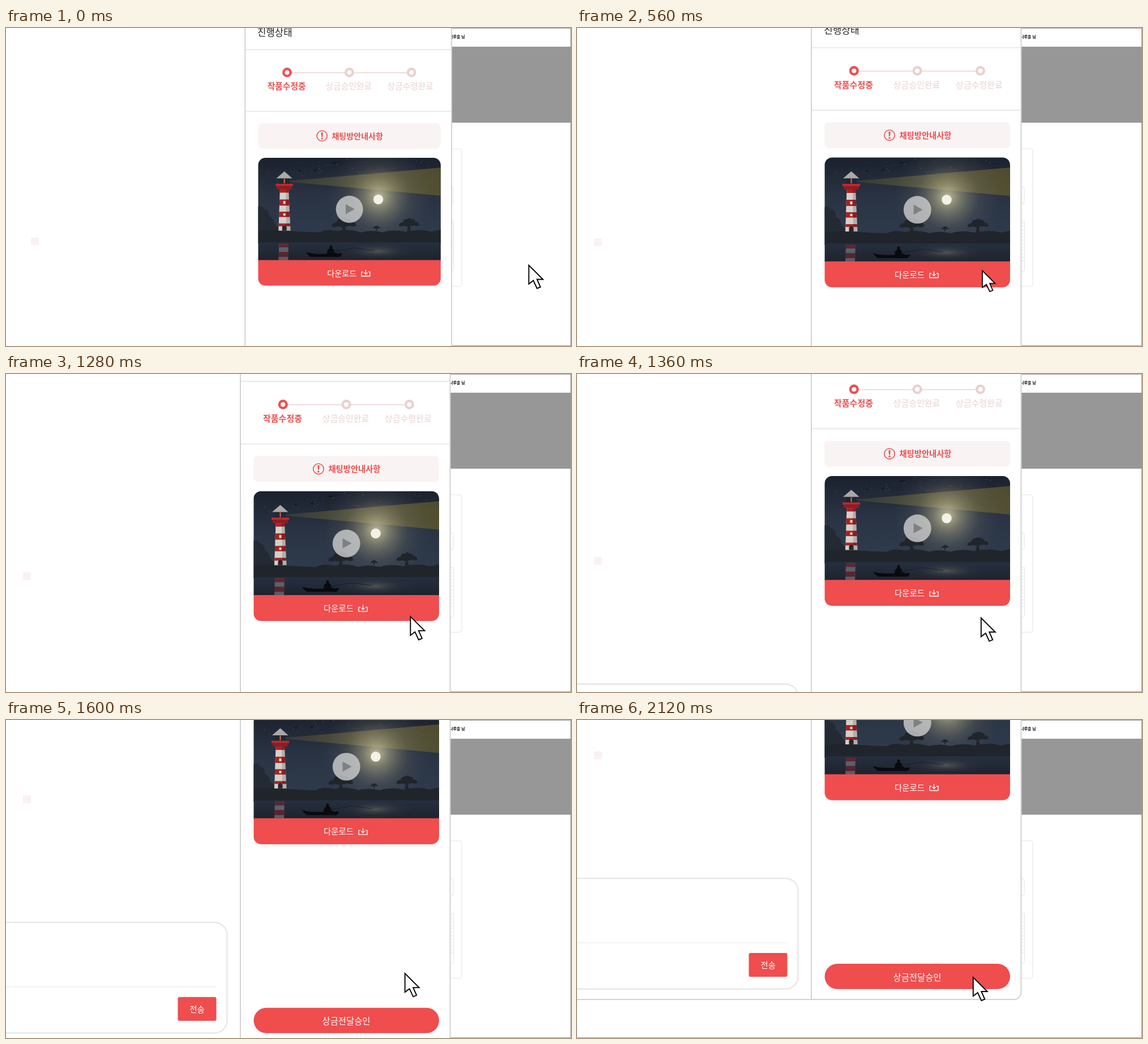
Write an HTML page that moves like this. It is 998x561 px and loops after 3.6 s.

```html
<!DOCTYPE html>
<html lang="ko">
<head>
<meta charset="utf-8">
<title>진행상태</title>
<style>
  html, body { margin: 0; width: 100%; height: 100%; overflow: hidden; background: #fff; }
  svg { display: block; width: 100vw; height: 100vh; }
  text { font-family: "Noto Sans CJK KR", "Noto Sans CJK", "Noto Sans KR", sans-serif; font-weight: 500; text-anchor: middle; }
  .bold { font-weight: 700; }
  .red { fill: #ef4d4e; }
  .pale { fill: #ebd0d0; }
  .white { fill: #fff; }
  .hair { fill: none; stroke: #e4e4e4; }
  .ring { fill: #fff; stroke: #ebd0d0; stroke-width: 4.4; }
  .ring.on { stroke: #ef4d4e; }
</style>
</head>
<body>
<svg viewBox="0 0 998 561" preserveAspectRatio="none">
  <defs>
    <linearGradient id="sky" x1="0" y1="0" x2="0" y2="1">
      <stop offset="0" stop-color="#1b212d"/>
      <stop offset=".45" stop-color="#293343"/>
      <stop offset="1" stop-color="#303c4e"/>
    </linearGradient>
    <linearGradient id="water" x1="0" y1="0" x2="0" y2="1">
      <stop offset="0" stop-color="#262f3f"/>
      <stop offset="1" stop-color="#1d232d"/>
    </linearGradient>
    <linearGradient id="beam">
      <stop offset="0" stop-color="#6b6434" stop-opacity=".25"/>
      <stop offset=".5" stop-color="#807742" stop-opacity=".55"/>
      <stop offset="1" stop-color="#635b2b" stop-opacity=".7"/>
    </linearGradient>
    <radialGradient id="glow">
      <stop offset="0" stop-color="#d9d2a4" stop-opacity=".85"/>
      <stop offset=".25" stop-color="#b5ae89" stop-opacity=".55"/>
      <stop offset=".6" stop-color="#7d7c6b" stop-opacity=".2"/>
      <stop offset="1" stop-color="#5a6065" stop-opacity="0"/>
    </radialGradient>
    <clipPath id="card"><rect x="437.5" y="228.5" width="327.5" height="229" rx="13"/></clipPath>
    <g id="tree" fill="#20252b">
      <path d="M-22 6q2-7 9-7q1-7 9-7q5-4 10 0q7 0 8 6q8 0 8 7q-5 3-11 0q-5 3-10 1q-6 3-11 0q-7 3-12 0z"/>
      <path d="M-2 4h4l2 15h-8z"/>
    </g>
  </defs>

  <!-- page behind the panel -->
  <rect width="998" height="561" fill="#fff"/>
  <rect y="33" width="998" height="134" fill="#979797"/>
  <path d="M0 .5H997.5V560.5H0" fill="none" stroke="#999"/>
  <text class="bold" x="810.5" y="18.4" font-size="6.8" style="text-anchor:end">나루솔 님</text>
  <rect class="hair" x="500" y="213" width="305" height="242.5" rx="4"/>
  <rect class="hair" x="500" y="279.5" width="290" height="31" rx="4"/>
  <path class="hair" d="M700 341H790.5V425q0 5-5 5H700"/>
  <path d="M787.5 344V412" stroke="#ececec" stroke-width="6" stroke-dasharray="1 5"/>

  <g id="panel">
    <rect x="-40" y="-200" width="824.5" height="1009" rx="13" fill="#fff" stroke="#d2d2d2" stroke-width="2"/>
    <path d="M414 -200V809" stroke="#d2d2d2" stroke-width="2"/>
    <path d="M415 34.7H783.5M415 145H783.5" stroke="#e9e9e9" stroke-width="1.8"/>

    <text x="467.3" y="10" font-size="17" fill="#222">진행상태</text>
    <path d="M489 76H712" stroke="#f1dcdc" stroke-width="2"/>
    <circle class="ring on" cx="489.3" cy="75.5" r="6.3"/>
    <circle class="ring" cx="601" cy="75.5" r="6.3"/>
    <circle class="ring" cx="712.5" cy="75.5" r="6.3"/>
    <text class="bold red" x="488.5" y="105.8" font-size="15">작품수정중</text>
    <text class="pale" x="600" y="105.8" font-size="15">상금승인완료</text>
    <text class="pale" x="710.5" y="105.8" font-size="15">상금수령완료</text>

    <rect x="437" y="166.5" width="328" height="45.5" rx="8" fill="#faf3f3"/>
    <circle cx="552" cy="189.2" r="9.2" fill="none" stroke="#ef4d4e" stroke-width="1.6"/>
    <path class="red" d="M550.3 183h3.4l-.7 8h-2zM550.5 192.6h3v2.8h-3z"/>
    <text class="bold red" x="615.5" y="194.5" font-size="14.3">채팅방안내사항</text>

    <g clip-path="url(#card)">
      <rect x="437" y="228" width="329" height="154" fill="url(#sky)"/>
      <g id="stars" fill="#a9b0bb"></g>
      <path d="M568 238l5-2 3 1 5-2-5 4zM508 252l4-1 3 1-3 1zM537 251l4-2 3 0-4 3z" fill="#10151d"/>
      <path d="M490 270L766 246V296.5L498 272z" fill="url(#beam)"/>
      <circle cx="654" cy="298" r="95" fill="url(#glow)"/>
      <circle cx="653" cy="303" r="8.8" fill="#f4f1e7"/>

      <path d="M437 316q8-3 11 4q10 2 9 13q10 5 10 14q7 4 7 14H437z" fill="#232a33"/>
      <use href="#tree" x="591" y="345"/>
      <use href="#tree" transform="translate(708 345) scale(.85)"/>
      <use href="#tree" transform="translate(650 353) scale(.3)"/>
      <path d="M437 361Q462 355 500 360Q530 362 548 362Q560 355 580 360Q600 355 622 362Q640 357 660 362Q680 356 702 361Q730 355 748 361L766 357V382H437z" fill="#20252b"/>

      <path d="M476.5 285H492L495.500 359H474z" fill="#d3d0ca"/>
      <path d="M476.500 285H492L492.300 291H476.200zM475.800 303H492.800L493.400 314H475.400zM475 325H494L494.400 334.500H474.700zM474.400 346H494.800L495 351H474.300z" fill="#a62328"/>
      <path d="M487 285H492L495.500 359H488z" fill="#000" opacity=".16"/>
      <rect x="469" y="275" width="31" height="4" fill="#c0292d"/>
      <rect x="471" y="279" width="27" height="6" fill="#8f1d22"/>
      <path d="M477 265V275M492 265V275M481 265V275M488 265V275" stroke="#181a20"/>
      <path d="M484.500 266v8" stroke="#d66a35" stroke-width="2"/>
      <path d="M470 265.300L484.500 252.800L498.500 265.300z" fill="#aaa9a8"/>
      <path d="M482.500 306h4v5h-4zM482.500 328h4v4h-4z" fill="#eadfb9"/>
      <path d="M480.500 359V352q4-5 8 0V359z" fill="#23262c"/>

      <rect x="437" y="380" width="329" height="33" fill="url(#water)"/>
      <ellipse cx="652" cy="396" rx="70" ry="17" fill="url(#glow)" opacity=".3"/>
      <g opacity=".42">
        <path d="M475 382H492L491 412H474z" fill="#aaa"/>
        <path d="M475 382h17v7h-17zM474 397h18v9h-18z" fill="#a62328"/>
      </g>
      <path d="M523 397Q530 400 545 400.500H575L588 399.500Q587 405 583 406H532Q525 402 523 397z" fill="#080a0e"/>
      <path d="M561 401q0-9 5-10q-2-5 2-5.500q4 .5 2 5.500q5 1 4 7l5 1-2 2z" fill="#080a0e"/>
      <path d="M571 397L611 390L647 395" fill="none" stroke="#141920" stroke-width=".7"/>

      <circle cx="601.3" cy="320.7" r="24.400" fill="#cfcfcf" opacity=".8"/>
      <path d="M594.500 311.500V329.500L610.500 320.500z" fill="#7e8082"/>
      <rect class="red" x="437" y="411.700" width="329" height="47"/>
    </g>
    <text class="white" x="587.600" y="440.800" font-size="14.400">다운로드</text>
    <path d="M626 433H623V440.500H638V433H635M630.500 429V437M627.500 434.200L630.500 437.200L633.500 434.200" fill="none" stroke="#fff" stroke-width="1.300"/>

    <rect x="30" y="371.500" width="14" height="13.500" fill="#faf1f1"/>
    <rect x="-40" y="595.500" width="430.500" height="195" rx="22" fill="#fff" stroke="#e2e2e2" stroke-width="1.800"/>
    <path d="M0 709H371" stroke="#efefef" stroke-width="1.500"/>
    <rect class="red" x="303.500" y="727" width="68" height="42" rx="3"/>
    <text class="white" x="337.500" y="754.300" font-size="14.500">전송</text>
    <rect class="red" x="437.500" y="746" width="327.500" height="44.800" rx="22.400"/>
    <text class="white" x="601" y="775.500" font-size="15.400">상금전달승인</text>
  </g>

  <path id="cursor" d="M1 1V34L9 28L15.500 42L21.500 39.500L15.500 26H26z" fill="#fff" stroke="#000" stroke-width="1.900"/>
</svg>
<script>
  const LOOP = 3600, STEP = 40;
  const panel = document.getElementById('panel');
  const cursor = document.getElementById('cursor');
  const stars = document.getElementById('stars');

  // Each key: [ms, value, velocity per second]
  const tracks = {
    zoom: [[0, .9845, .116], [400, 1, 0]],
    scroll: [[1120, 0, 0], [1360, 48.5, 400], [1480, 133.5, 900], [1680, 279.5, 245], [2120, 316, 0]],
    x: [[0, 922.5, 0], [440, 713.8, 0], [1120, 713.8, 0], [1360, 712.800, -10], [1480, 709.800, -40], [1680, 701, -13], [2120, 698.800, 0]],
    y: [[0, 417.500, 0], [440, 425, 0]],
    press: [[440, 1, 0], [560, .9, 0], [720, 1, 0]]
  };

  function valueAt(keys, t) {
    if (t <= keys[0][0]) return keys[0][1];
    const i = keys.findIndex(key => key[0] > t);
    if (i < 0) return keys[keys.length - 1][1];
    const [t0, v0, d0] = keys[i - 1], [t1, v1, d1] = keys[i];
    const span = (t1 - t0) / 1000, u = (t - t0) / (t1 - t0), w = 1 - u;
    return v0 * w * w * (1 + 2 * u) + v1 * u * u * (3 - 2 * u) + span * u * w * (d0 * w - d1 * u);
  }

  function addStars(count) {
    let seed = 7;
    const random = () => (seed = seed * 16807 % 2147483647) / 2147483647;
    for (let i = 0; i < count; i++) {
      const star = document.createElementNS('http://www.w3.org/2000/svg', 'circle');
      star.setAttribute('cx', 440 + random() * 322);
      star.setAttribute('cy', 231 + random() * 32);
      star.setAttribute('r', .3 + random() * .35);
      star.setAttribute('opacity', .6);
      stars.append(star);
    }
  }

  function draw(t) {
    const now = {};
    for (const name in tracks) now[name] = valueAt(tracks[name], t);
    const y = now.y + now.scroll * 28 / 316;
    panel.setAttribute('transform',
      `translate(951 264) scale(${now.zoom}) translate(-951 ${-264 - now.scroll})`);
    cursor.setAttribute('transform',
      `translate(${now.x + 13} ${y + 21.5}) scale(${now.press}) translate(-13 -21.5)`);
  }

  const start = performance.now();
  function tick() {
    const t = (performance.now() - start) % LOOP;
    draw(Math.floor(t / STEP) * STEP);
    requestAnimationFrame(tick);
  }

  addStars(45);
  draw(0);
  requestAnimationFrame(tick);
</script>
</body>
</html>
```
